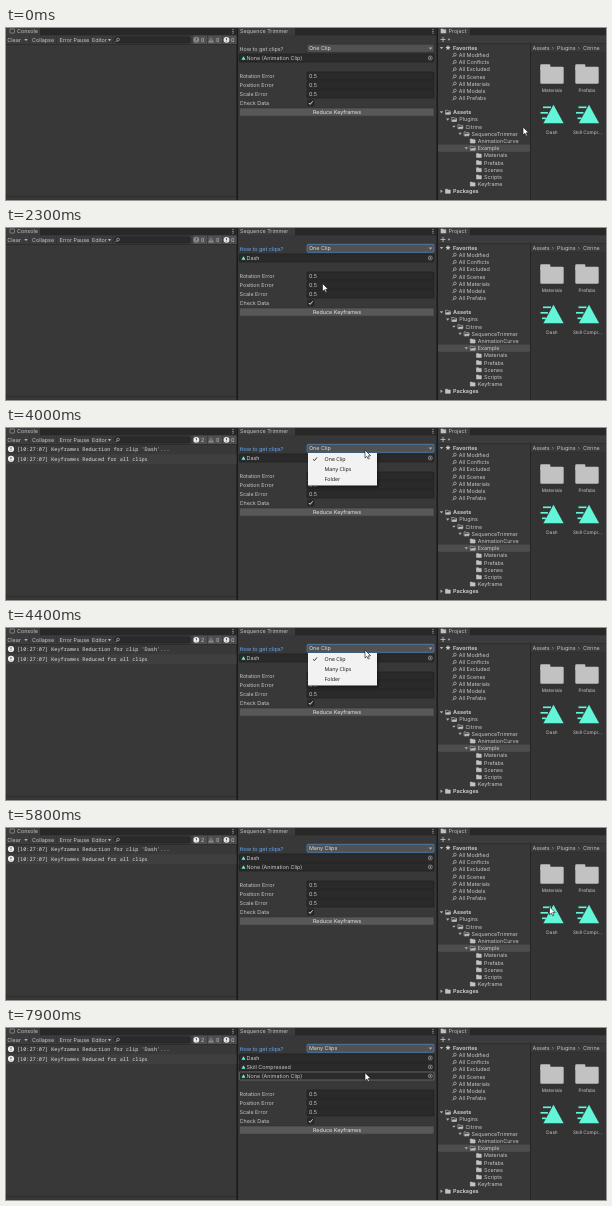
Animation, 600 px wide and 172 px high, one loop 8 s. Source, as an HTML page with a canvas:

```html
<!DOCTYPE html>
<html lang="en">
<head>
<meta charset="utf-8">
<title>Animation clip editor</title>
<style>
html, body { margin: 0; width: 100%; height: 100%; overflow: hidden; background: #191919; }
canvas { display: block; width: 600px; height: 172px; }
</style>
</head>
<body>
<canvas id="stage"></canvas>
<script>
const canvas = document.getElementById('stage');
const ctx = canvas.getContext('2d');
const ratio = window.devicePixelRatio || 1;
canvas.width = 600 * ratio;
canvas.height = 172 * ratio;

const LOOP = 8000, STEP = 100;
const UI = 'Inter, sans-serif';
const MONO = '"Noto Sans Mono", monospace';
const MENU = '"Open Sans", sans-serif';
const INK = '#c8c8c8', TEAL = '#62f5d8', PANEL = '#383838', BAR = '#3c3c3c';
const OPTIONS = ['One Clip', 'Many Clips', 'Folder'];

// Pointer path: time, x, y
const PATH = [
  [0, 517, 99], [200, 517, 99], [700, 545, 86], [1000, 545, 86],
  [1300, 324.7, 20.3], [1600, 318, 23], [1900, 300, 30], [2000, 300, 30],
  [2600, 333, 81], [3200, 333, 81], [3900, 359, 22], [4400, 359, 22],
  [4800, 341, 40], [5200, 341, 40], [6000, 581, 86], [6300, 581, 86],
  [6500, 423, 65], [6600, 409.5, 59], [7000, 345, 40], [7300, 345, 40],
  [7800, 359, 44.7], [7900, 359, 44.7]
];

const between = (t, a, b) => t >= a && t < b;

function pointerAt(t) {
  const i = PATH.findIndex(key => key[0] >= t);
  if (i < 1) return PATH[0].slice(1);
  const [t0, x0, y0] = PATH[i - 1], [t1, x1, y1] = PATH[i];
  const p = (t - t0) / (t1 - t0), e = p * p * (3 - 2 * p);
  return [x0 + (x1 - x0) * e, y0 + (y1 - y0) * e];
}

const inside = ([px, py], x, y, w, h) => px >= x && px < x + w && py >= y && py < y + h;

function rect(x, y, w, h, color) {
  ctx.fillStyle = color;
  ctx.fillRect(x, y, w, h);
}

function box(x, y, w, h, fill, border, r = 1) {
  ctx.beginPath();
  ctx.roundRect(x, y, w, h, r);
  ctx.fillStyle = fill;
  ctx.fill();
  if (border) {
    ctx.strokeStyle = border;
    ctx.lineWidth = 0.6;
    ctx.stroke();
  }
}

// y is the middle of the capitals
function text(str, x, y, { color = INK, size = 5.4, font = UI, weight = 400, align = 'left' } = {}) {
  ctx.font = `${weight} ${size}px ${font}`;
  ctx.textAlign = align;
  ctx.fillStyle = color;
  ctx.fillText(str, x, y + size * 0.36);
}

function poly(points, color, stroke) {
  ctx.beginPath();
  points.forEach(([x, y]) => ctx.lineTo(x, y));
  ctx.closePath();
  ctx.fillStyle = color;
  ctx.fill();
  if (stroke) {
    ctx.strokeStyle = stroke;
    ctx.lineWidth = 0.6;
    ctx.stroke();
  }
}

function line(points, color, width = 0.6) {
  ctx.beginPath();
  points.forEach(([x, y]) => ctx.lineTo(x, y));
  ctx.strokeStyle = color;
  ctx.lineWidth = width;
  ctx.stroke();
}

function circle(x, y, r, fill, stroke, width = 0.6) {
  ctx.beginPath();
  ctx.arc(x, y, r, 0, 7);
  if (fill) { ctx.fillStyle = fill; ctx.fill(); }
  if (stroke) { ctx.strokeStyle = stroke; ctx.lineWidth = width; ctx.stroke(); }
}

const down = (x, y, r = 1.7, color = '#b0b0b0') =>
  poly([[x - r, y - r * 0.6], [x + r, y - r * 0.6], [x, y + r * 0.7]], color);

const tick = (x, y, color) => line([[x - 1.8, y], [x - 0.6, y + 1.4], [x + 2, y - 1.7]], color, 0.9);

function lens(x, y) {
  circle(x + 0.4, y - 0.4, 1.4, null, INK);
  line([[x - 0.7, y + 0.7], [x - 2, y + 2]], INK, 0.8);
}

function badge(x, y, r, color) {
  circle(x, y, r, color);
  rect(x - 0.4, y - r * 0.6, 0.8, r * 0.7, '#333');
  rect(x - 0.4, y + r * 0.35, 0.8, 0.7, '#333');
}

function smallFolder(x, y, open) {
  poly([[x - 2.5, y - 2], [x - 0.5, y - 2], [x, y - 1.3], [x + 2.3, y - 1.3], [x + 2.3, y + 2], [x - 2.5, y + 2]],
    open ? PANEL : '#c2c2c2', '#c2c2c2');
  if (open) poly([[x - 1.5, y], [x + 3, y], [x + 2.2, y + 2], [x - 2.5, y + 2]], '#c2c2c2');
}

function bigFolder(x, y, name) {
  box(x - 11.7, y - 9.8, 10, 6, '#c2c2c2');
  box(x - 11.7, y - 7.3, 23.4, 17, '#c2c2c2', null, 1.3);
  text(name, x, y + 16.5, { size: 4.7, align: 'center' });
}

const triangle = (x, y, s) => poly([[x, y - s], [x + s * 1.1, y + s], [x - s * 1.1, y + s]], TEAL);

function clipAsset(x, name, selected) {
  triangle(x + 1.5, 86, 9.2);
  // Speed lines running into the left edge
  for (const [left, right, y] of [[-9, -1, 79.3], [-11.5, -4, 84.8], [-10, -6, 90.3]])
    line([[x + left, y], [x + right, y]], TEAL, 1.7);
  if (selected) {
    const half = name.length > 4 ? 15 : 11;
    box(x - half, 101, half * 2, 7, '#2c5d87', null, 1.5);
  }
  text(name, x, 104.5, { size: 4.7, align: 'center', color: selected ? '#fff' : INK });
}

function panel(x, w, tabWidth) {
  rect(x, 0, w, 172, PANEL);
  rect(x, 0, w, 7.5, '#282828');
  rect(x, 0, tabWidth, 7.5, BAR);
}

function dots(x) {
  for (const y of [1.5, 3.3, 5.1]) circle(x, y, 0.6, '#c4c4c4');
}

function consolePanel(t) {
  const logged = t >= 2900;
  panel(0, 230.5, 34);
  box(4, 1, 4.5, 4, PANEL, '#aaa', 0.4);
  text('Console', 11, 3);
  dots(227);
  rect(0, 7.5, 230.5, 8.5, BAR);
  text('Clear', 1.2, 12);
  down(20, 12);
  text('Collapse', 26, 12);
  text('Error Pause', 53.5, 12);
  text('Editor', 86, 12);
  down(103.5, 12);
  for (const x of [23.5, 50.5, 84, 106]) rect(x, 7.5, 0.5, 8.5, '#2b2b2b');
  box(108.5, 8.8, 76, 6.2, '#2a2a2a', '#212121', 2.5);
  lens(111.6, 12);
  rect(186, 7.5, 44.5, 8.5, '#505050');
  for (const x of [186, 201.3, 216]) rect(x, 7.5, 0.5, 8.5, '#2b2b2b');
  badge(190.3, 11.8, 2.9, logged ? '#f0f0f0' : '#8a8a8a');
  text(logged ? '2' : '0', 195, 12);
  poly([[205, 9.2], [208, 14.4], [202, 14.4]], '#8a8a8a');
  rect(204.7, 11, 0.7, 2, '#333');
  text('0', 210, 12);
  badge(220.5, 11.8, 2.9, '#e4e4e4');
  text('0', 225, 12);
  rect(0, 16, 230.5, 0.5, '#232323');
  if (logged) {
    rect(0, 26.3, 230.5, 9.7, '#3f3f3f');
    ["Keyframes Reduction for clip 'Dash'...", 'Keyframes Reduced for all clips'].forEach((msg, i) => {
      const y = 21 + i * 9.8;
      badge(5, y, 3.1, '#f0f0f0');
      text('[10:27:07] ' + msg, 11, y, { size: 5.2, font: MONO, weight: 500, color: '#e0e0e0' });
    });
  }
  rect(0, 168, 230.5, 0.8, '#2a2a2a');
}

function clipsAt(t) {
  if (t < 2000) return [null];
  if (t < 4900) return ['Dash'];
  return t < 7300 ? ['Dash', null] : ['Dash', 'Skill Compressed', null];
}

function editorPanel(t, clips, hover) {
  const focused = t >= 1200;
  const field = (x, y, w, h) =>
    box(x, y, w, h, '#2a2a2a', inside(hover, x, y, w, h) ? '#858585' : '#1c1c1c');

  panel(232, 198.5, 57);
  text('Sequence Trimmer', 234, 3);
  dots(427);
  text('How to get clips?', 233.5, 20.8, { color: focused ? '#63adf5' : INK });
  box(301, 16.3, 127, 8, '#515151', focused ? '#4c94dc' : '#303030');
  text(t < 4900 ? OPTIONS[0] : OPTIONS[1], 303, 20.3, { color: '#e0e0e0' });
  down(424.5, 20.5);

  clips.forEach((clip, i) => {
    const y = 30 + i * 9;
    field(233.3, y - 4, 194.7, 8);
    triangle(237.5, y, 1.8);
    text(clip || 'None (Animation Clip)', 240.5, y);
    circle(424.3, y, 2, null, INK, 0.5);
    circle(424.3, y, 0.7, INK);
  });

  const top = 39 + clips.length * 9;
  ['Rotation Error', 'Position Error', 'Scale Error'].forEach((name, i) => {
    const y = top + i * 9;
    text(name, 233.5, y);
    field(301, y - 4, 127, 8);
    text('0.5', 303, y);
  });
  text('Check Data', 233.5, top + 27);
  box(301.7, top + 24, 6, 6, '#2a2a2a', '#1c1c1c');
  tick(304.7, top + 27, '#e8e8e8');

  const over = inside(hover, 233, top + 32, 195, 8.3);
  const pressed = between(t, 2700, 2900);
  box(233.3, top + 32, 194.7, 8.2, pressed ? '#46607c' : over ? '#676767' : '#585858', '#303030');
  text('Reduce Keyframes', 331, top + 36.2, { align: 'center', color: '#e4e4e4' });
}

// Tree rows: indent, name, arrow (1 open, 0 none)
const TREE = [
  [1, 'Plugins', 1], [2, 'Citrine', 1], [3, 'SequenceTrimmer', 1], [4, 'AnimationCurve', 0],
  [4, 'Example', 1], [5, 'Materials', 0], [5, 'Prefabs', 0], [5, 'Scenes', 0],
  [5, 'Scripts', 0], [4, 'Keyframe', 0]
];

function projectPanel(t) {
  panel(432, 168, 32);
  smallFolder(437.5, 3, false);
  text('Project', 442.5, 3);
  rect(432, 7.5, 168, 8.3, BAR);
  line([[434.5, 11.5], [439.5, 11.5]], INK, 0.8);
  line([[437, 9], [437, 14]], INK, 0.8);
  down(443, 11.7, 1.4);
  rect(432, 15.6, 168, 0.5, '#232323');

  const star = [...Array(10).keys()].map(i => {
    const r = i % 2 ? 1.2 : 2.8, a = i * Math.PI / 5;
    return [442 + r * Math.sin(a), 19.8 - r * Math.cos(a)];
  });
  down(435.5, 20);
  poly(star, '#d0d0d0');
  text('Favorites', 447, 19.8, { weight: 700 });
  ['Modified', 'Conflicts', 'Excluded', 'Scenes', 'Materials', 'Models', 'Prefabs'].forEach((name, i) => {
    const y = 27 + i * 7.2;
    lens(448.5, y);
    text('All ' + name, 452.7, y);
  });

  rect(432, 116.6, 92, 7.2, '#4d4d4d');
  down(435.5, 84.3);
  smallFolder(442, 84.3, true);
  text('Assets', 447, 84.3, { weight: 700 });
  TREE.forEach(([depth, name, open], i) => {
    const x = 447 + depth * 6.2, y = 91.5 + i * 7.18;
    if (open) down(x - 11.5, y);
    smallFolder(x - 5, y, open);
    text(name, x, y);
  });
  poly([[434.5, 161.6], [434.5, 165], [436.8, 163.3]], '#b0b0b0');
  smallFolder(442, 163.3, false);
  text('Packages', 447, 163.3, { weight: 700 });

  rect(524, 16, 76, 156, '#333');
  rect(524, 16, 76, 8.3, PANEL);
  rect(524, 24.3, 76, 0.5, '#2a2a2a');
  rect(524, 16, 0.7, 156, '#212121');
  ['Assets', 'Plugins', 'Citrine'].forEach((name, i) => {
    const x = [526.5, 551, 577][i];
    text(name, x, 20.3);
    if (i) line([[x - 5, 18.9], [x - 3.6, 20.3], [x - 5, 21.7]], '#aaa');
  });
  bigFolder(546, 46, 'Materials');
  bigFolder(581, 46, 'Prefabs');
  clipAsset(546, 'Dash', between(t, 800, 1100));
  clipAsset(581.5, 'Skill Compr...', between(t, 6100, 6400));
}

function menu(t, pointer) {
  const style = { font: MENU, size: 5.3, color: '#111' };
  if (between(t, 4000, 4900)) {
    ctx.save();
    ctx.shadowColor = '#0009';
    ctx.shadowBlur = 3 * ratio;
    ctx.shadowOffsetX = ctx.shadowOffsetY = ratio;
    rect(302, 25, 69, 32.5, '#f2f2f2');
    ctx.restore();
    OPTIONS.forEach((name, i) => {
      const y = 31.2 + i * 9.8;
      if (inside(pointer, 303, y - 4.9, 67, 9.8)) rect(303, y - 4.7, 67, 9.4, '#a0a0a0');
      text(name, 318.5, y, style);
    });
    tick(309, 31.2, '#222');
  } else if (between(t, 4900, 5400)) {
    // The chosen item lingers and fades
    ctx.globalAlpha = Math.min(1, (5400 - t) / 300);
    rect(303, 36.4, 67, 9.4, '#a0a0a0');
    text(OPTIONS[1], 318.5, 41, style);
    ctx.globalAlpha = 1;
  }
}

function drawPointer([x, y], blocked) {
  if (blocked) {
    circle(x, y, 3, '#fff', '#d3202c', 1.4);
    line([[x - 2, y - 2], [x + 2, y + 2]], '#d3202c', 1.4);
    return;
  }
  const shape = [[0, 0], [0, 8], [1.9, 6.3], [3.1, 9], [4.4, 8.4], [3.2, 5.8], [5.7, 5.7]];
  poly(shape.map(([dx, dy]) => [x + dx, y + dy]), '#fff', '#111');
}

function draw(now) {
  const t = Math.floor(now % LOOP / STEP) * STEP;
  const pointer = pointerAt(t);
  const clips = clipsAt(t);
  const dragging = between(t, 1100, 2000) || between(t, 6400, 7300);
  const onTarget = inside(pointer, 233, 17 + clips.length * 9, 195, 8);

  ctx.setTransform(ratio, 0, 0, ratio, 0, 0);
  ctx.textRendering = 'geometricPrecision';
  rect(0, 0, 600, 172, '#191919');
  consolePanel(t);
  // Hover trails the pointer by one step
  editorPanel(t, clips, pointerAt(t - STEP));
  projectPanel(t);
  menu(t, pointer);
  drawPointer(pointer, dragging && !onTarget);
}

const start = performance.now();
function tickFrame() {
  draw(performance.now() - start);
  requestAnimationFrame(tickFrame);
}
tickFrame();
</script>
</body>
</html>
```
